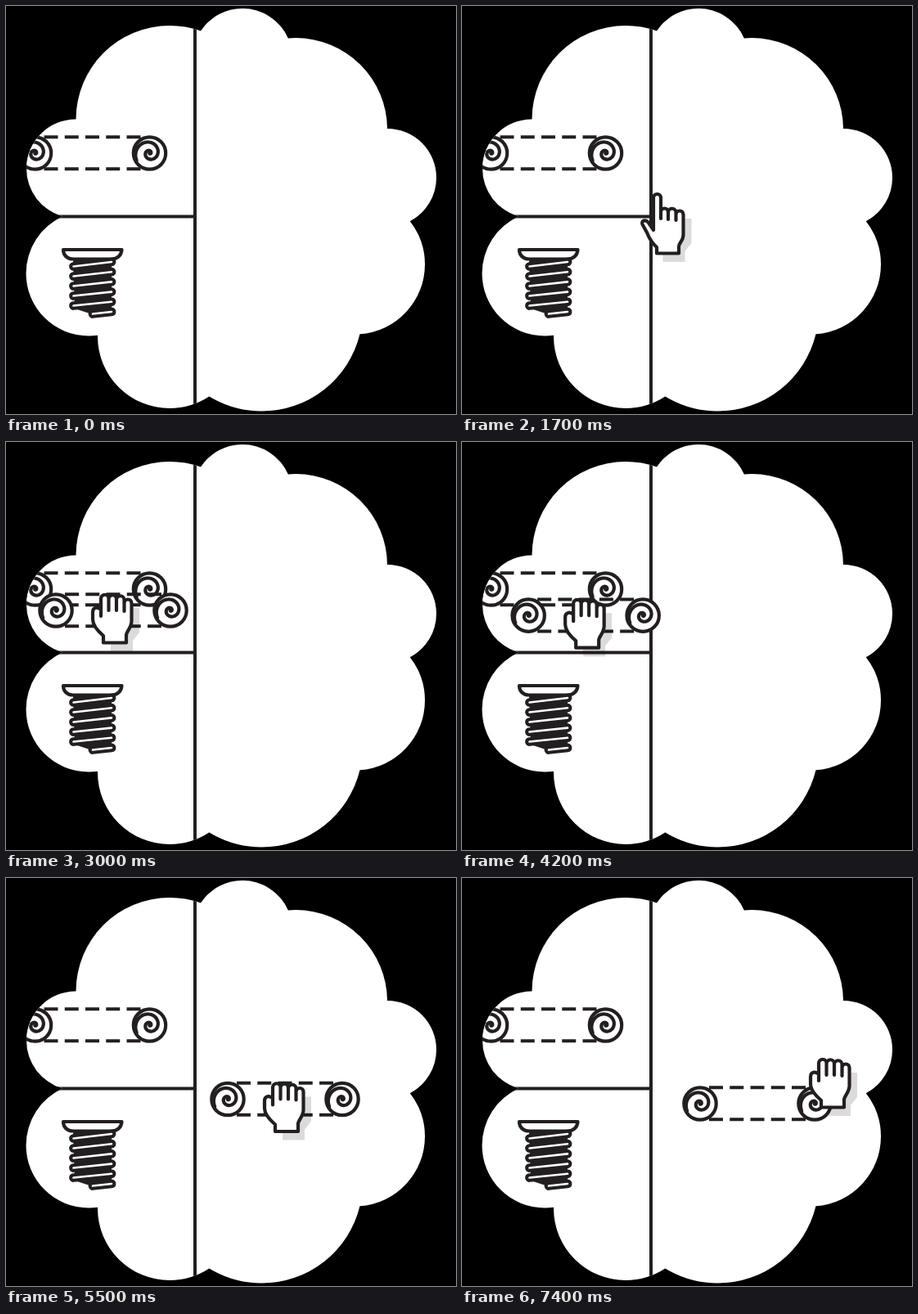
These frames come from a looping animation (550x499 px, 8000 ms). An HTML page:

```html
<!DOCTYPE html>
<html lang="en">
<head>
<meta charset="utf-8">
<title>Drag and drop</title>
<style>
  html, body { margin: 0; width: 100%; height: 100%; overflow: hidden; background: #000; }
  svg { display: block; width: 550px; height: 499px; }
  .ink { fill: none; stroke: #231f20; stroke-width: 4.2; stroke-linejoin: round; stroke-linecap: round; }
  .solid { fill: #fff; }
  .flat { stroke-width: 4; stroke-linecap: butt; }
</style>
</head>
<body>
<svg viewBox="0 0 550 499">
  <defs>
    <clipPath id="cloud">
      <circle cx="289" cy="64" r="61"/>
      <circle cx="200" cy="138.500" r="114.500"/>
      <circle cx="354" cy="151" r="112"/>
      <circle cx="466" cy="210" r="60"/>
      <circle cx="426.500" cy="316" r="85.500"/>
      <circle cx="312.500" cy="372" r="123.500"/>
      <circle cx="200" cy="404" r="88"/>
      <circle cx="101" cy="327" r="76.500"/>
      <circle cx="85.500" cy="199" r="60.500"/>
      <path d="M200 139L289 64L354 151L466 210L427 316L314 372L200 404L101 327L85 199z"/>
    </clipPath>
    <g id="curl">
      <circle class="ink solid" r="19.700"/>
      <path id="spiral" class="ink"/>
    </g>
    <g id="scroll">
      <path class="ink flat" stroke-dasharray="17 8.250" d="M11 -19.700H129M11 19.300H129"/>
      <use href="#curl"/>
      <use href="#curl" x="140"/>
    </g>
    <path id="shade" fill="#000" fill-opacity=".14" d="M30 18H59V48L51 58V71H24V58z"/>
  </defs>

  <g clip-path="url(#cloud)">
    <rect width="550" height="499" fill="#fff"/>
    <path class="ink flat" d="M231 20V495M40 257.500H231"/>
    <use href="#scroll" x="35.500" y="180"/>

    <g id="screw">
      <path fill="#231f20" d="M82 310H129V376H104L102 376L84 370z"/>
      <path class="ink solid" d="M70 298H141.500C141 305 136 309.500 129 309.500H82C75 309.500 70 305 70 298z"/>
    </g>

    <use id="copy" href="#scroll"/>
    <circle id="knob" class="ink solid" cx="461" cy="245"/>

    <g id="hand">
      <g id="point">
        <use href="#shade" x="1.500" y="6"/>
        <path class="ink solid" d="M14 38V-1.500a4.500 4.500 0 0 1 9 0V24V16a4.500 4.500 0 0 1 9 0V25V16.500a4.700 4.700 0 0 1 9.500 0V26V19a4.500 4.500 0 0 1 9 0V44C50.500 51 45 54 45 58V66.500H18V59C11 53 8 46 6 41L1 32C-2 27 4 24 8 29z"/>
      </g>
      <g id="grab">
        <use href="#shade"/>
        <path class="ink solid" d="M12 28V6.500a4.750 4.750 0 0 1 9.500 0V21V7a4.750 4.750 0 0 1 9.500 0V21V8a4.750 4.750 0 0 1 9.500 0V22V12a4.500 4.500 0 0 1 9 0V34C49.500 42 43 47 43 51V60.500H15V52C8 46 2 38 2 32V23C2 17 8 16 12 20z"/>
      </g>
    </g>
  </g>
</svg>

<script>
const $ = id => document.getElementById(id);
const show = (id, on) => $(id).style.display = on ? '' : 'none';

// Spiral winding out until it merges with the rim
const N = 90;
$('spiral').setAttribute('d', 'M' + Array.from({ length: N + 1 }, (_, i) => {
  const u = i / N, r = 18.3 * u ** 1.9;
  const a = Math.PI * (150 / 180 + (1 - u) * 4.4);
  return (r * Math.cos(a)).toFixed(2) + ' ' + (r * Math.sin(a)).toFixed(2);
}).join('L'));

// Screw threads: dark capsules with a light core
function thread(d) {
  for (const [color, width] of [['#231f20', 10.8], ['#fff', 2.6]]) {
    $('screw').insertAdjacentHTML('beforeend',
      `<path d="${d}" fill="none" stroke="${color}" stroke-width="${width}" stroke-linecap="round"/>`);
  }
}
for (let i = 0; i < 5; i++) thread(`M82.500 ${318.5 + 12 * i}L129 ${313 + 12.2 * i}`);
thread('M106 376.500L129 374');

// Hand path: time, x, y
const path = [
  [500, 439.5, 330], [1200, 302.5, 279], [1300, 283, 270], [1700, 220, 236],
  [2200, 159.5, 204], [2800, 104, 185], [4100, 104, 185], [4700, 225, 222],
  [5000, 267, 234.5], [5500, 314, 249.5], [5800, 334, 255], [6100, 363.5, 268],
  [6500, 363.5, 268], [7400, 424, 220], [8000, 424, 220]
];

function handAt(t) {
  const i = Math.max(1, path.findIndex(k => k[0] >= t));
  const [t0, x0, y0] = path[i - 1], [t1, x1, y1] = path[i];
  const u = Math.max(0, (t - t0) / (t1 - t0));
  return [x0 + (x1 - x0) * u, y0 + (y1 - y0) * u];
}

function draw(ms) {
  const t = Math.floor(ms % 8000 / 100) * 100;   // ten steps a second
  const [x, y] = handAt(t);
  const grab = t >= 3000 && t < 5900 || t >= 7400;
  show('hand', t >= 500);
  show('grab', grab);
  show('point', !grab);
  $('hand').setAttribute('transform', `translate(${x} ${y})`);

  const [dx, dy] = handAt(Math.min(t, 5800));
  show('copy', t >= 3000);
  $('copy').setAttribute('transform', `translate(${dx - 43} ${dy + 21})`);

  show('knob', t >= 6300);
  $('knob').setAttribute('r', t < 6400 ? 5 : 8.5);
}

const start = performance.now();
function tick() {
  draw(performance.now() - start);
  requestAnimationFrame(tick);
}
tick();
</script>
</body>
</html>
```
